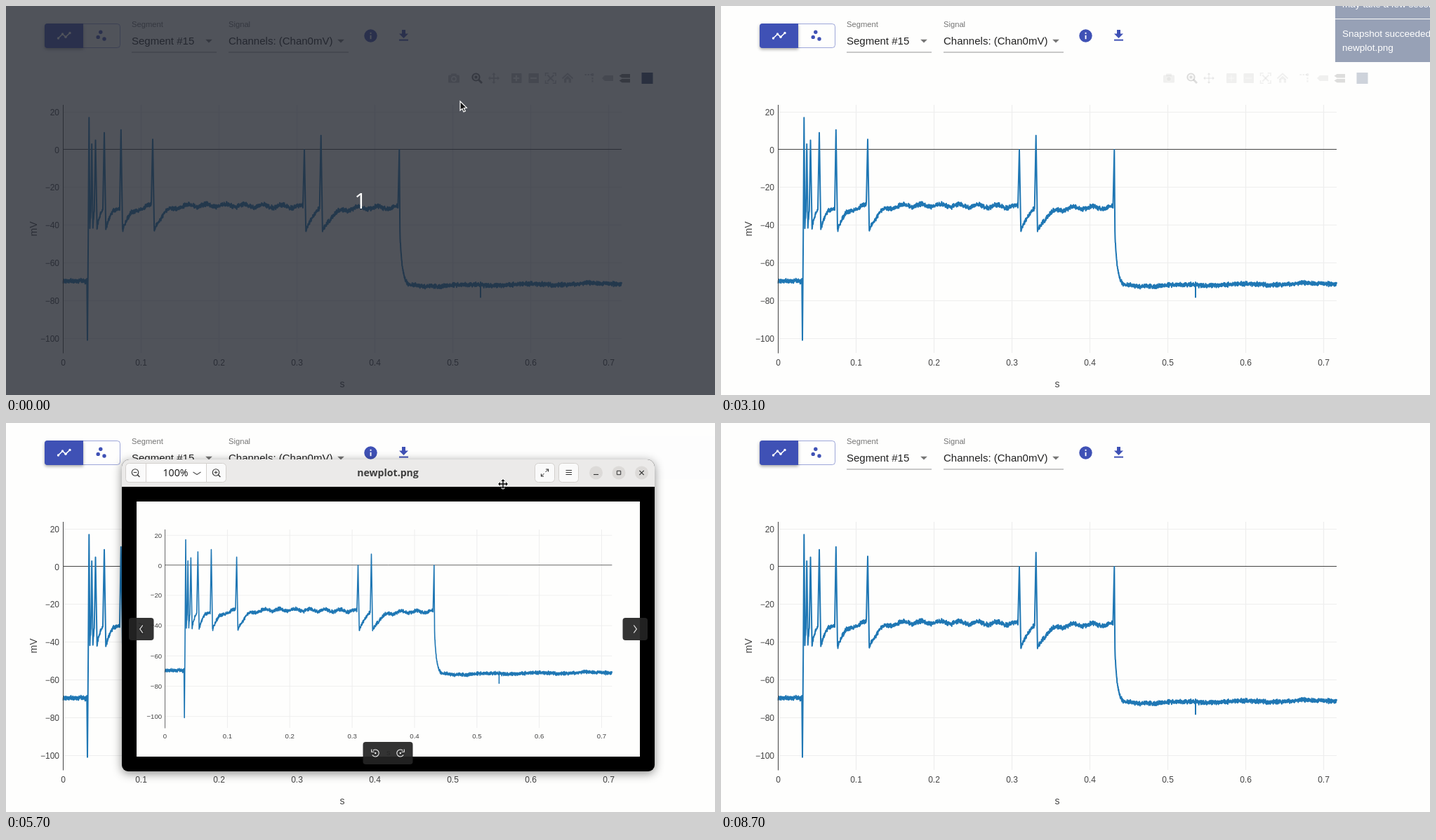
Write an HTML page with a canvas that moves like this. It is 1010x555 px and loops after 9700 ms.

```html
<!DOCTYPE html>
<html lang="en">
<head>
<meta charset="utf-8">
<title>Trace viewer</title>
<style>
html, body { margin: 0; width: 100%; height: 100%; overflow: hidden; background: #fefefd; }
canvas { display: block; }
</style>
</head>
<body>
<canvas id="stage" width="1010" height="555"></canvas>
<script>
const LOOP = 9700, STEP = 100;
const SANS = '"Liberation Sans", Arial, sans-serif', UI = '"Open Sans", "Noto Sans", sans-serif';
const INDIGO = '#3f51b5', PAPER = '#fefefd', INK = '#444', IDLE = '#c7c7c7', ACTIVE = '#7c7c7c';
const stage = document.getElementById('stage').getContext('2d');
const MARGIN = 24, WIN_W = 759, WIN_H = 445;
const winCanvas = document.createElement('canvas');
winCanvas.width = WIN_W + 2 * MARGIN;
winCanvas.height = WIN_H + 2 * MARGIN;
const winContext = winCanvas.getContext('2d');
let g = stage;

// ---- drawing helpers ----
function text(str, x, y, size, color = INK, align = 'left', family = SANS, weight = '') {
  g.font = `${weight} ${size}px ${family}`;
  g.textAlign = align;
  g.fillStyle = color;
  g.fillText(str, x, y);
}
function paint(fill, stroke, width = 1) {
  if (fill) { g.fillStyle = fill; g.fill(); }
  if (stroke) { g.strokeStyle = stroke; g.lineWidth = width; g.stroke(); }
}
function box(x, y, w, h, r, fill, stroke) {
  g.beginPath();
  g.roundRect(x, y, w, h, r);
  paint(fill, stroke);
}
function dot(x, y, r, fill, stroke, width) {
  g.beginPath();
  g.arc(x, y, r, 0, 7);
  paint(fill, stroke, width);
}
function poly(points, fill, stroke, width) {
  g.beginPath();
  for (let i = 0; i < points.length; i += 2) g.lineTo(points[i], points[i + 1]);
  if (fill) g.closePath();
  paint(fill, stroke, width);
}
function line(x0, y0, x1, y1, color, width) {
  poly([x0, y0, x1, y1], null, color, width);
}
function triangle(x, y, halfWidth, height, color) {
  poly([x - halfWidth, y, x + halfWidth, y, x, y + height], color);
}
function at(x, y, draw) {
  g.save();
  g.translate(x, y);
  draw();
  g.restore();
}
function quarters(x, y, draw) {
  at(x, y, () => {
    for (let i = 0; i < 4; i++) { draw(); g.rotate(Math.PI / 2); }
  });
}
function plus(x, y, r, color, width) {
  line(x - r, y, x + r, y, color, width);
  line(x, y - r, x, y + r, color, width);
}
function cross(x, y, r, color, width) {
  at(x, y, () => { g.rotate(Math.PI / 4); plus(0, 0, r * Math.SQRT2, color, width); });
}
function fade(alpha, draw) {
  if (alpha <= 0) return;
  g.save();
  g.globalAlpha *= Math.min(alpha, 1);
  draw();
  g.restore();
}
function shadow(color, blur, dy, draw) {
  g.save();
  g.shadowColor = color;
  g.shadowBlur = blur;
  g.shadowOffsetY = dy;
  draw();
  g.restore();
}

// ---- motion helpers ----
const ramp = (t, from, to) => Math.min(1, Math.max(0, (t - from) / (to - from)));
const smooth = p => p * p * (3 - 2 * p);
const easeCubic = p => p < .5 ? 4 * p ** 3 : 1 - 4 * (1 - p) ** 3;
const mix = (a, b, p) => a + (b - a) * p;
const glide = (p, a, b) => [mix(a[0], b[0], p), mix(a[1], b[1], p)];

// ---- voltage trace: spikes on a current step, with exponential recovery ----
const toY = mV => 205 - mV * 2.69;
const STEP_ON = 116, STEP_OFF = 560.3, END = 877;
const spikeX = [118.3, 122.2, 127.5, 140, 163.8, 209, 425, 448.7];
const spikePeak = [17, 3, 5, 9, 10.5, 5.5, 0, 7.5];
const wander = (x, peak, period) => Math.cos((x - peak) * 2 * Math.PI / period);
const plateau = x => -29.3 - (x - 250) * .005 + .8 * wander(x, 258.7, 27);
const resting = x => -72.1 + (x - 600) * .004 + .4 * wander(x, 655, 90);

function buildTrace() {
  const path = new Path2D();
  let seed = 1;
  const random = () => {
    seed = (seed * 16807) % 2147483647;
    return seed / 2147483647 * 2 - 1;
  };
  const noisy = (from, to, value) => {
    for (let x = from; x < to; x += .25) path.lineTo(x, toY(value(x) + (random() + random()) * .72));
  };
  noisy(81.5, STEP_ON - .5, () => -69.7);
  path.lineTo(STEP_ON, toY(-101));
  path.lineTo(STEP_ON + 1.2, toY(-45));
  spikeX.forEach((x, i) => {
    const next = spikeX[i + 1] ?? STEP_OFF, gap = next - x;
    const width = Math.min(2.2, gap * .3), start = x + width;
    const tau = Math.min(14, gap * .4);
    path.lineTo(x, toY(spikePeak[i]));
    noisy(start, next - Math.min(1.8, width), s => plateau(s) - 13 * Math.exp((start - s) / tau));
  });
  path.lineTo(STEP_OFF, toY(0));
  noisy(STEP_OFF + .9, END, x => resting(x) + 27.5 * Math.exp((STEP_OFF + .9 - x) / 3.3));
  path.moveTo(676, toY(-70));
  path.lineTo(676, toY(-78.5));
  return path;
}
const trace = buildTrace();

function chart() {
  for (let i = 0; i < 8; i++) {
    const x = 81.5 + 111 * i;
    if (i) line(x, 141, x, 495, '#eee', 1.3);
    text(String(i / 10), x, 513, 12, INK, 'center');
  }
  for (let v = 20; v >= -100; v -= 20) {
    const y = Math.floor(toY(v)) + .5;
    if (v) line(81, y, END, y, '#eee', 1.1);
    text(String(v).replace('-', '−'), 76, y + 4, 12, INK, 'right');
  }
  line(81, 204.5, END, 204.5, INK);
  g.lineJoin = 'round';
  g.strokeStyle = '#1f77b4';
  g.lineWidth = 2;
  g.stroke(trace);
  g.lineJoin = 'miter';
  line(81.5, 141, 81.5, 495.5, INK);
  text('s', 479, 544, 14, INK, 'center');
  at(44, 318, () => { g.rotate(-Math.PI / 2); text('mV', 0, 0, 14, INK, 'center'); });
}

// ---- page ----
function select(label, value, x, width) {
  text(label, x, 30, 11.2, 'rgba(0,0,0,.54)');
  text(value, x, 54.5, 15, 'rgba(0,0,0,.87)');
  line(x, 66, x + width, 66, 'rgba(0,0,0,.42)');
  triangle(x + width - 11, 47.8, 4.8, 4.8, 'rgba(0,0,0,.54)');
}
function toolbar() {
  box(55.5, 25.5, 107, 34, 4, PAPER, 'rgba(63,81,181,.5)');
  shadow('rgba(0,0,0,.35)', 4, 2, () => box(55, 25, 55, 35, [4, 0, 0, 4], INDIGO));
  const zigzag = [74.5, 46, 80.5, 40, 85, 44.2, 91, 38.5];
  poly(zigzag, null, '#fff', 1.6);
  for (let i = 0; i < zigzag.length; i += 2) dot(zigzag[i], zigzag[i + 1], 1.7, '#fff');
  for (const [x, y] of [[131.2, 44.4], [134.8, 37.3], [140, 47]]) dot(x, y, 2.7, INDIGO);
  select('Segment', 'Segment #15', 179, 121);
  select('Signal', 'Channels: (Chan0mV)', 317, 171);
  dot(519.5, 42.5, 9.2, INDIGO);
  box(518.6, 37.8, 1.9, 2, 0, '#fff');
  box(518.6, 41.7, 1.9, 5.5, 0, '#fff');
  box(564, 34, 5, 6, 0, INDIGO);
  triangle(566.5, 39.5, 6.5, 6.5, INDIGO);
  box(560, 47.6, 13, 2, 0, INDIGO);
}

function crossArrows(x, y, r, color, width) {
  quarters(x, y, () => {
    line(0, 0, 0, 1 - r, color, width);
    triangle(0, 3 - r, 2.7, -3, color);
  });
}
function tag(x, y, w, h, color) {
  poly([x, y, x + 4, y - h / 2, x + w, y - h / 2, x + w, y + h / 2, x + 4, y + h / 2], color);
}
function modebar(cameraOn) {
  const camera = cameraOn ? ACTIVE : IDLE, mid = 103;
  box(630, 98.5, 16, 11, 1.5, camera);
  box(634, 96.5, 8, 4, 1, camera);
  dot(638, 104, 3.1, camera, PAPER, 1.6);
  dot(669.5, 101.5, 5, null, ACTIVE, 2.2);
  box(667.5, 99.5, 4, 4, 0, ACTIVE);
  line(673, 105, 678, 110, ACTIVE, 2.8);
  crossArrows(695, mid, 8, IDLE, 1.8);
  for (const x of [727, 751.5]) box(x - 7, 96, 14.5, 14, 1, IDLE);
  plus(727, mid, 4.3, PAPER, 2.2);
  line(747, mid, 756, mid, PAPER, 2.2);
  cross(775.8, mid, 4.5, IDLE, 1.8);
  quarters(775.8, mid, () => poly([-7.3, -3, -7.3, -7.3, -3, -7.3], null, IDLE, 1.5));
  poly([792.5, 103.5, 800, 96.5, 807.5, 103.5], null, IDLE, 1.9);
  triangle(800, 104.5, 5, -5, IDLE);
  for (const x of [795, 801.7]) box(x, 104, 3.3, 5.5, 0, IDLE);
  for (let i = 0; i < 3; i++) box(824.5 + 4 * i, 97, 2.5, 2, 0, IDLE);
  dot(835.5, 98, 2, IDLE);
  for (const y of [102, 106]) box(834.5, y, 2, 2.6, 0, IDLE);
  tag(849, mid, 16, 8, IDLE);
  for (const y of [99.8, 106.6]) tag(873.5, y, 15.5, 5.4, ACTIVE);
  box(905.5, 95, 16, 16, 0, '#3f4f75');
}
function tooltip() {
  triangle(638, 118.5, 5, -5.5, '#69738a');
  box(509.5, 118.5, 146.5, 28, 2, '#69738a');
  text('Download plot as a png', 519, 136.5, 12.15, '#fff');
}
function notice(t, delay, bottom, height, ...lines) {
  const s = t - delay;
  const alpha = easeCubic(ramp(s, 2015, 2715)) - easeCubic(ramp(s, 5030, 5730));
  fade(alpha, () => {
    box(875, bottom - height, 160, height, 0, 'rgba(140,151,175,.9)');
    lines.reverse().forEach((str, i) => text(str, 885, bottom - 16 - 20 * i, 13.5, '#fff'));
  });
}

// ---- image viewer window, drawn from its own top left corner ----
function magnifier(x, zoomIn) {
  dot(x, 18.5, 4.7, null, '#333', 1.1);
  line(x + 3.4, 22, x + 6.4, 25, '#333', 1.4);
  line(x - 2.3, 18.5, x + 2.3, 18.5, '#333');
  if (zoomIn) line(x, 16.2, x, 20.8, '#333');
}
function titleButtons(backdrop) {
  const edge = '#d3d0cd', face = '#fafafa', glyph = '#333';
  box(5.5, 5.5, 143, 27, 5, face, edge);
  box(34.5, 5.5, 86, 27, 0, '#fff', edge);
  magnifier(19, false);
  magnifier(134, true);
  text('100%', 58.5, 24, 14.2, '#111', 'left', UI);
  poly([101.5, 18, 107, 21.5, 112.5, 18], null, '#555', 1.1);
  for (const x of [588.5, 622.5]) box(x, 5.5, 28, 27, 5, face, edge);
  for (const dir of [1, -1]) at(602.5, 19, () => {
    g.scale(dir, dir);
    line(1, -1, 5, -5, glyph);
    poly([1.5, -5, 5, -5, 5, -1.5], null, glyph, 1.2);
  });
  for (const y of [15.5, 18.5, 21.5]) line(632.5, y, 641, y, glyph);
  if (!backdrop) for (const x of [675.5, 708, 740.5]) dot(x, 19, 9.5, '#dcdad8');
  line(672, 21.5, 679, 21.5, glyph, 1.1);
  box(705.3, 16.3, 5.4, 5.4, 0, null, glyph);
  cross(740.5, 19, 3.2, glyph, 1.2);
}
function overlayControls() {
  const shade = 'rgba(36,36,36,.93)', glyph = '#eee';
  for (const [x, dir] of [[10, -1], [713.5, 1]]) {
    box(x, 226, 35.5, 32, 4, shade);
    const c = x + 17.8;
    poly([c - 2 * dir, 236.5, c + 2 * dir, 242, c - 2 * dir, 247.5], null, glyph, 1.2);
  }
  box(343.5, 403, 71, 32, 4, shade);
  for (const dir of [1, -1]) at(379 - 17.8 * dir, 419, () => {
    g.scale(dir, 1);
    g.beginPath();
    g.arc(0, 0, 5, -2.3, 2.6);
    paint(null, glyph, 1.1);
    poly([-5.5, -5.5, -5.5, -1.8, -1.8, -1.8], null, glyph, 1.1);
    dot(0, 0, 1.2, glyph);
  });
}
function viewer(t) {
  const backdrop = t >= 5000 && t < 5500;
  g.clearRect(0, 0, winCanvas.width, winCanvas.height);
  at(MARGIN, MARGIN, () => {
    shadow(`rgba(0,0,0,${backdrop ? .25 : .45})`, 14, 3, () => box(0, 0, WIN_W, WIN_H, [11, 11, 9, 9], '#000'));
    box(0, 0, WIN_W, 39, [11, 11, 0, 0], backdrop ? '#f3f3f2' : '#ebeae9');
    text('newplot.png', 379, 24, 14.1, '#3d3d3d', 'center', UI, 'bold');
    titleButtons(backdrop);
    box(21, 60, 717, 364, 0, PAPER);
    at(-3.7, -12.9, () => { g.scale(.8005, .8); chart(); });
    fade(ramp(t, 4500, 4800) - ramp(t, 7100, 7500), overlayControls);
  });
}
function drawWindow(t, [x, y]) {
  g = winContext;
  viewer(t);
  g = stage;
  const closing = ramp(t, 8200, 8700), scale = 1 - .2 * closing;
  fade(1 - closing, () => at(x + WIN_W / 2, y + WIN_H / 2, () => {
    g.scale(scale, scale);
    g.drawImage(winCanvas, -WIN_W / 2 - MARGIN, -WIN_H / 2 - MARGIN);
  }));
}

// ---- pointers ----
function arrow() {
  poly([0, 0, 0, 13, 3, 10.4, 5, 15, 7.3, 14, 5.2, 9.6, 9.3, 9.3], '#111', '#fff', 1.2);
}
function hand() {
  g.lineJoin = 'round';
  poly([-1, 0, 1, 0, 1.3, 4.5, 7, 6, 6, 13.5, 0, 13.5, -4.5, 7.5, -1.2, 8], '#111', '#fff', 1.2);
}
function moveCursor() {
  crossArrows(0, 0, 8, '#fff', 4);
  crossArrows(0, 0, 7, '#111', 1.6);
}
function pointer(t, [wx, wy]) {
  const rest = [647, 136], camera = [648, 107], grip = [wx + 543, wy + 35];
  const dropped = [705, 85], closeButton = [895, 69];
  if (t < 700) at(...glide(ramp(t, 200, 700), rest, camera), arrow);
  else if (t <= 2500) at(...camera, hand);
  else if (t <= 3000) at(...glide(ramp(t, 2500, 3000), camera, [1020, 40]), arrow);
  else if (t >= 4500 && t < 4900) at(...glide(ramp(t, 4500, 4900), [850, 110], grip), arrow);
  else if (t >= 4900 && t < 6000) at(...grip, moveCursor);
  else if (t >= 6000 && t < 8000) at(...glide(smooth(ramp(t, 6880, 7800)), dropped, closeButton), arrow);
}

function render(t) {
  g.fillStyle = PAPER;
  g.fillRect(0, 0, 1010, 555);
  toolbar();
  chart();
  const hovering = t >= 700 && t <= 2500;
  fade(1 - ramp(t, 2800, 3200), () => modebar(hovering));
  if (hovering) tooltip();
  if (t >= 2300) {
    notice(t, 0, 18, 61, 'may take a few seconds');
    notice(t, 67, 80, 61, 'Snapshot succeeded -', 'newplot.png');
  }
  const corner = [
    mix(251, 160, smooth(ramp(t, 4825, 5840))),
    mix(15, 53, smooth(ramp(t, 5020, 5770)))
  ].map(Math.round);
  if (t >= 4100 && t < 8700) drawWindow(t, corner);
  if (t < 100) {
    g.fillStyle = 'rgba(37,41,51,.8)';
    g.fillRect(0, 0, 1010, 555);
    text('1', 505, 289, 31, '#fff', 'center', UI);
  }
  pointer(t, corner);
}

const start = performance.now();
function tick() {
  const t = (performance.now() - start) % LOOP;
  render(Math.floor(t / STEP) * STEP);
  requestAnimationFrame(tick);
}
tick();
</script>
</body>
</html>
```
